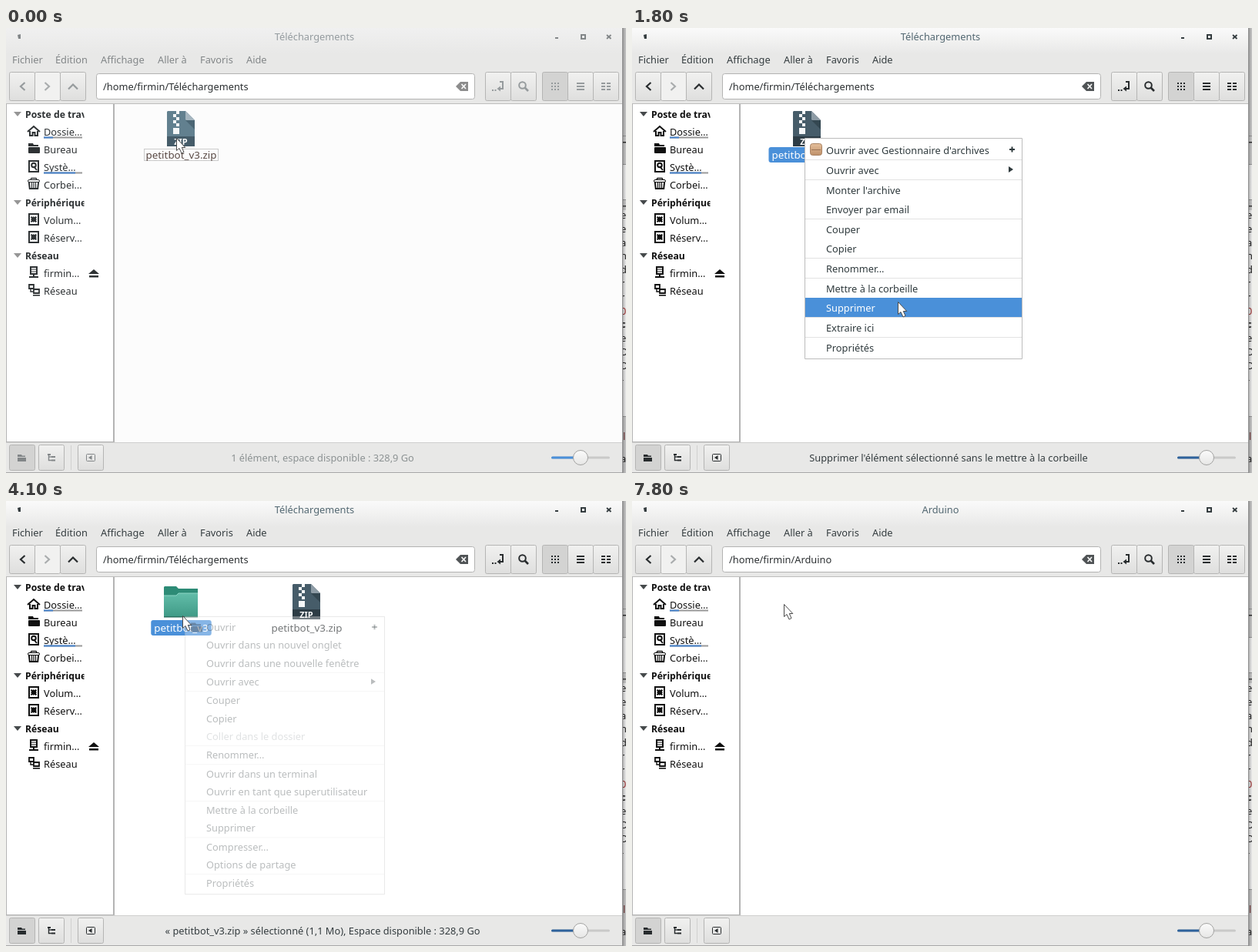
Write an HTML page with a canvas that moves like this. It is 805 px wide and 579 px high and loops after 8000 ms.

```html
<!DOCTYPE html>
<html lang="fr">
<head>
<meta charset="utf-8">
<style>
html, body { margin: 0; width: 100%; height: 100%; overflow: hidden; background: #fff; }
canvas { display: block; }
</style>
</head>
<body>
<canvas id="stage" width="805" height="579"></canvas>
<script>
const ctx = document.getElementById('stage').getContext('2d');
const FONT = '"Noto Sans", "Open Sans", sans-serif';
const BLUE = '#4a90d9', INK = '#2f3a3d', USER = 'firmin';
const LOOP = 8000, STEP = 100;

// ---------- drawing helpers ----------
function rect(x, y, w, h, c) { ctx.fillStyle = c; ctx.fillRect(x, y, w, h); }

function box(x, y, w, h, r, fill, stroke) {
  ctx.beginPath();
  ctx.roundRect(x, y, w, h, r);
  if (fill) { ctx.fillStyle = fill; ctx.fill(); }
  if (stroke) { ctx.strokeStyle = stroke; ctx.lineWidth = 1; ctx.stroke(); }
}

function trace(pts) {
  ctx.beginPath();
  for (let i = 0; i < pts.length; i += 2) ctx.lineTo(pts[i], pts[i + 1]);
}

function poly(pts, c) { trace(pts); ctx.fillStyle = c; ctx.fill(); }

function line(pts, c, w = 2) {
  trace(pts);
  ctx.strokeStyle = c;
  ctx.lineWidth = w;
  ctx.stroke();
}

function text(s, x, y, c, align = 'left', weight = 400, size = 12.8) {
  ctx.font = `${weight} ${size}px ${FONT}`;
  ctx.textAlign = align;
  ctx.fillStyle = c;
  ctx.fillText(s, x, y);
}

function grad(y0, y1, a, b) {
  const g = ctx.createLinearGradient(0, y0, 0, y1);
  g.addColorStop(0, a);
  g.addColorStop(1, b);
  return g;
}

function mix(a, b, p) {
  const v = a.map((n, i) => Math.round(n + (b[i] - n) * p));
  return `rgb(${v})`;
}

const clamp = v => Math.max(0, Math.min(1, v));

function at(x, y, draw) {
  ctx.save();
  ctx.translate(x, y);
  draw();
  ctx.restore();
}

// ---------- pointer ----------
const path = [
  [0, 221, 143], [1100, 221, 143], [1500, 323, 311], [2000, 360, 386], [2100, 364, 388],
  [3300, 364, 388], [3500, 278, 213], [3600, 278, 213], [3700, 229, 149], [4500, 229, 149],
  [4900, 295, 250], [5000, 300, 262], [5100, 300, 262], [5300, 306, 288], [6000, 306, 288],
  [6700, 76, 132], [7000, 76, 132], [7500, 212, 138], [7800, 197, 134], [8000, 197, 134]
];

function pointerAt(t) {
  const i = path.findIndex(k => k[0] > t);
  const [t0, x0, y0] = path[i - 1], [t1, x1, y1] = path[i];
  const p = (t - t0) / (t1 - t0);
  return { x: Math.round(x0 + (x1 - x0) * p), y: Math.round(y0 + (y1 - y0) * p) };
}

function drawPointer({ x, y }) {
  at(x + .5, y + .5, () => {
    const arrow = [0, 0, 0, 16, 3.5, 13, 6.5, 19.5, 9.5, 18, 6.8, 12, 11.3, 12, 0, 0];
    poly(arrow, '#fff');
    line(arrow, '#4a4a4a', 1);
  });
}

// ---------- menus: groups of [label, status] ----------
const CUT = 'Préparer les fichiers sélectionnés à être déplacés avec une commande « Coller »';
const COPY = 'Préparer les fichiers sélectionnés à être copiés avec « Coller »';
const TRASH = "Déplacer l'élément sélectionné vers la corbeille";
const DELETE = "Supprimer l'élément sélectionné sans le mettre à la corbeille";
const RENAME = "Renomme l'élément sélectionné";
const PROPS = "Afficher les propriétés de l'élément sélectionné";
const CHOOSE = "Choisir une application pour ouvrir l'élément sélectionné";

const zipMenu = {
  x: 224, y: 143, w: 283, start: 600, end: 2400, tx: 252, mark: 493, icon: 'archive',
  groups: [
    [["Ouvrir avec Gestionnaire d'archives", "Ouvrir l'élément sélectionné avec Gestionnaire d'archives"]],
    [['Ouvrir avec', CHOOSE]],
    [["Monter l'archive", "Monter l'archive sélectionnée"], ['Envoyer par email', "Envoyer l'élément sélectionné par email"]],
    [['Couper', CUT], ['Copier', COPY]],
    [['Renommer...', RENAME]],
    [['Mettre à la corbeille', TRASH], ['Supprimer', DELETE]],
    [['Extraire ici', "Extraire l'archive sélectionnée dans l'emplacement actuel"]],
    [['Propriétés', PROPS]]
  ]
};

const dirMenu = {
  x: 232, y: 150, w: 260, start: 4000, end: 5900, tx: 260, mark: 478, icon: 'folder', off: 'Coller dans le dossier',
  groups: [
    [['Ouvrir', "Ouvrir l'élément sélectionné dans cette fenêtre"],
     ['Ouvrir dans un nouvel onglet', "Ouvrir l'élément sélectionné dans un nouvel onglet"],
     ['Ouvrir dans une nouvelle fenêtre', "Ouvrir l'élément sélectionné dans une nouvelle fenêtre"]],
    [['Ouvrir avec', CHOOSE]],
    [['Couper', CUT], ['Copier', COPY], ['Coller dans le dossier', '']],
    [['Renommer...', RENAME]],
    [['Ouvrir dans un terminal', ''], ['Ouvrir en tant que superutilisateur', '']],
    [['Mettre à la corbeille', TRASH], ['Supprimer', DELETE]],
    [['Compresser...', ''], ['Options de partage', '']],
    [['Propriétés', PROPS]]
  ]
};

for (const m of [zipMenu, dirMenu]) {
  let y = m.y + 3;
  m.rows = [];
  m.rules = [];
  for (const g of m.groups) {
    for (const [label, hint] of g) {
      m.rows.push({ label, hint, y });
      y += 25;
    }
    m.rules.push(y++);
  }
  m.rules.pop();
  m.h = y - 1 + 3 - m.y;
}

function hovered(m, c) {
  if (c.x < m.x || c.x > m.x + m.w) return;
  return m.rows.find(r => c.y >= r.y && c.y < r.y + 25);
}

function smallFolder(x, y, c) {
  poly([x, y, x + 6, y, x + 7, y + 2, x + 13, y + 2, x + 13, y + 4, x, y + 4], c);
  box(x, y + 5, 15, 8, 1, c);
}

function drawMenu(m, t, c) {
  const p = clamp((t - m.start) / 300), hit = hovered(m, c);
  ctx.save();
  ctx.globalAlpha = p;
  ctx.translate(0, m.y);
  ctx.scale(1, .9 + .1 * p);
  ctx.translate(0, -m.y);
  box(m.x + .5, m.y + .5, m.w - 1, m.h - 1, 0, '#fff', '#bcbcbc');
  for (const y of m.rules) rect(m.x + 1, y, m.w - 2, 1, '#e2e2e2');
  m.rows.forEach((r, i) => {
    const on = r === hit;
    if (on) rect(m.x + 1, r.y, m.w - 2, 25, BLUE);
    const ink = on ? '#fff' : r.label === m.off ? '#a3a9aa' : INK;
    text(r.label, m.tx, r.y + 17.5, ink);
    const k = m.mark, y = r.y + 12;
    if (i === 0) {
      rect(k - 3, y - 1, 7, 2, ink);
      rect(k - .5, y - 3.5, 2, 7, ink);
    }
    if (r.label === 'Ouvrir avec') poly([k - 4, y - 4, k + 2, y, k - 4, y + 4], ink);
  });
  const first = m.rows[0].y;
  if (m.icon === 'archive') {
    box(231.5, 150.5, 15, 15, 3, grad(150, 166, '#e6c09c', '#bd8f68'), '#a98262');
    rect(233, 158, 12, 1, '#9a7355');
  } else smallFolder(240, first + 6, hit === m.rows[0] ? '#fff' : '#2e2e2e');
  ctx.restore();
}

// ---------- file icons ----------
function zipIcon(cx, lit) {
  at(cx - 18, 108, () => {
    poly([0, 1, 1, 0, 24, 0, 36, 12, 36, 46, 0, 46], lit ? '#62808f' : '#465c69');
    poly([24, 0, 36, 12, 25, 12, 24, 11], lit ? '#a5b5bf' : '#8d9ba5');
    poly([24, 12, 36, 12, 36, 24], lit ? '#4b6674' : '#344751');
    rect(0, 33, 36, 13, lit ? '#455c69' : '#2d3c45');
    for (let i = 0; i < 5; i++) rect(i % 2 ? 8 : 12, i * 4, 4, 4, '#f5f7f8');
    rect(8, 22, 8, 8, '#f5f7f8');
    text('ZIP', 18, 43.5, '#fff', 'center', 800, 11);
  });
}

function folderIcon(cx, top, lit) {
  at(cx - 22, top, () => {
    poly([0, 1, 1, 0, 16, 0, 19, 3, 44, 3, 44, 20, 0, 20], lit ? '#3da58d' : '#2d8b76');
    const front = [0, 12, 16, 12, 19, 9, 44, 9, 44, 40, 0, 40];
    poly(front, grad(9, 40, lit ? '#76d2bd' : '#62bda9', lit ? '#4fae99' : '#3f9a86'));
    line(front.slice(0, 8), '#8bd5c5', 1);
    rect(0, 39, 44, 1.5, '#28705f');
  });
}

function label(s, cx, y, state) {
  const size = 13.4;
  ctx.font = `400 ${size}px ${FONT}`;
  const w = ctx.measureText(s).width;
  if (state === 'selected') box(cx - w / 2 - 4, y - 15, w + 8, 20, 3, BLUE);
  if (state === 'focus') {
    ctx.setLineDash([1, 1]);
    box(179.5, y - 12.5, 96, 15, 0, null, '#999');
    ctx.setLineDash([]);
  }
  text(s, cx, y, state === 'selected' ? '#fff' : state === 'focus' ? '#5a4a45' : '#303436', 'center', 400, size);
}

const homeDirs = ['Arduino', 'Bureau', 'Documents', 'Images', 'Modèles', 'Musique', 'Public', 'Téléchargements', 'Vidéos'];

function drawFiles(t) {
  if (t >= 7700) return;
  if (t >= 6900) {
    homeDirs.forEach((s, i) => {
      const cx = 227 + 163 * (i % 4), y = 111 + 94 * Math.floor(i / 4);
      folderIcon(cx, y, i === 0 && t >= 7400);
      label(s, cx, y + 59, i === 0 && t >= 7600 ? 'selected' : '');
    });
    return;
  }
  const out = t >= 2900, zx = out ? 390 : 227;
  zipIcon(zx, t < 600);
  label('petitbot_v3.zip', zx + .5, 170, t < 600 ? 'focus' : t < 4000 ? 'selected' : '');
  if (out) {
    folderIcon(227, 111, t >= 3700 && t < 4000);
    label('petitbot_v3', 227.5, 170, t >= 4000 ? 'selected' : '');
  }
}

// ---------- sidebar ----------
function drive(c) {
  line([1, 1, 13, 1, 13, 15, 1, 15, 1, 0], c, 2);
}

const sideIcons = {
  home(c) {
    line([-1, 9, 7, 2, 15, 9], c, 2);
    line([2, 8, 2, 14, 5.5, 14, 5.5, 10, 8.5, 10, 8.5, 14, 12, 14, 12, 8], c, 2);
  },
  folder(c) { smallFolder(0, 1, c); },
  disk(c) {
    drive(c);
    ctx.beginPath();
    ctx.arc(7, 6.5, 2.8, 0, 7);
    ctx.strokeStyle = c;
    ctx.stroke();
    line([7, 8, 11, 13], c, 2);
  },
  trash(c) {
    box(-.5, 2.5, 15, 3, 1.5, null, c);
    line([3, 2, 4, .5, 10, .5, 11, 2], c, 1.4);
    line([.8, 5, 1.8, 14, 12.2, 14, 13.2, 5], c, 2);
    for (const x of [4.5, 7, 9.5]) line([x, 6, x, 13], c, 1.2);
  },
  chip(c) {
    drive(c);
    rect(4, 5, 6, 6, c);
    for (const x of [4, 6.5, 9]) rect(x, 4, 1, 8, c);
    for (const y of [5, 7.5, 10]) rect(3, y, 8, 1, c);
  },
  server(c) {
    line([3, 1, 11, 1, 11, 10, 3, 10, 3, 0], c, 2);
    line([4, 4, 10, 4], c, 1);
    line([4, 7, 10, 7], c, 1);
    rect(6, 10, 2, 4, c);
    rect(1, 13, 12, 2, c);
  },
  net(c) {
    line([1, 1, 7, 1, 7, 6, 1, 6, 1, 0], c, 1.8);
    line([7, 7, 14, 7, 14, 12, 7, 12, 7, 6], c, 1.8);
    line([3, 7, 3, 10, 6, 10], c, 1.4);
    rect(6, 14, 9, 1.6, c);
  }
};

const side = [
  ['Poste de travail'], ['Dossie…', 'home', 12], ['Bureau', 'folder'], ['Systè…', 'disk', 41], ['Corbei…', 'trash'],
  ['Périphériques'], ['Volum…', 'chip'], ['Réserv…', 'chip'],
  ['Réseau'], [USER + '…', 'server'], ['Réseau', 'net']
];

function drawSide(c, f) {
  const ink = mix([46, 50, 52], [16, 16, 16], f);
  rect(0, 99, 140, 440, '#fff');
  side.forEach(([s, icon, used], i) => {
    const y = 112 + 23 * i;
    if (!icon) {
      poly([10, y - 3, 20, y - 3, 15, y + 3], mix([150, 150, 150], [70, 74, 76], f));
      ctx.save();
      ctx.beginPath();
      ctx.rect(0, y - 12, 101.5, 24);
      ctx.clip();
      text(s, 25, y + 5, ink, 'left', 700, 12.2);
      ctx.restore();
      return;
    }
    const on = c.x < 139 && c.y >= y - 12 && c.y < y + 11;
    if (on) rect(0, y - 12, 139, 23, BLUE);
    const col = on ? '#fff' : ink;
    at(29, y - 9, () => sideIcons[icon](col));
    text(s, 49, y + 5, on ? '#dfeaf6' : ink);
    if (used) {
      rect(49, y + 6.5, 50, 2, '#9a9a9a');
      rect(49, y + 6.5, used, 2, '#4a86cf');
    }
    if (icon === 'server') {
      poly([107, y + 1, 114, y - 5, 121, y + 1], ink);
      rect(108, y + 3, 12, 2.5, ink);
    }
  });
  rect(0, 99, 1, 440, '#b4b4b4');
  rect(0, 538, 140, 1, '#b4b4b4');
  rect(139, 99, 2, 440, '#b4b4b4');
}

// ---------- window frame ----------
function button(x, y, w, h, state) {
  const fill = state === 'on' ? '#d3d3d2' : state === 'off' ? '#f1f1f0' : grad(y, y + h, '#f1f1f0', '#dededd');
  box(x + .5, y + .5, w - 1, h - 1, 2, fill, '#b5b5b4');
}

function drawBar(f) {
  const g = mix([150, 155, 157], [40, 44, 46], f);
  const dim = '#a9acad';
  button(4, 57, 34, 38);
  button(37, 57, 34, 38, 'off');
  button(70, 57, 34, 38);
  line([24.5, 71, 19, 76, 24.5, 81], g, 2.2);
  line([50.5, 71, 56, 76, 50.5, 81], dim, 2.2);
  line([81, 79.5, 87, 73.5, 93, 79.5], g, 2.2);

  box(117.5, 59.5, 491, 33, 3, '#fff', '#b3b3b2');
  poly([584, 76, 590, 70, 600, 70, 600, 82, 590, 82], mix([140, 140, 140], [80, 84, 86], f));
  line([591.5, 73, 597, 79], '#fff', 1.6);
  line([597, 73, 591.5, 79], '#fff', 1.6);

  button(622, 57, 34, 38);
  button(655, 57, 34, 38);
  rect(631, 80, 2, 2, g);
  rect(634.5, 80, 2, 2, g);
  line([641, 70, 645, 70, 645, 79, 641, 79], g, 2);
  poly([637.5, 79, 642, 75.5, 642, 82.5], g);
  ctx.beginPath();
  ctx.arc(670.5, 74.5, 4.3, 0, 7);
  ctx.strokeStyle = g;
  ctx.lineWidth = 2;
  ctx.stroke();
  line([673.5, 77.5, 678, 82], g, 2.6);

  button(696, 57, 34, 38, 'on');
  button(729, 57, 34, 38);
  button(762, 57, 34, 38);
  for (const y of [71, 75, 79]) {
    for (const x of [708, 712, 716]) rect(x, y, 2, 2, g);
    rect(741, y, 10, 2, g);
    rect(773, y, 5, 2, g);
    rect(780, y, 5, 2, g);
  }
}

function drawFoot(f, status) {
  const g = mix([130, 134, 136], [40, 44, 46], f);
  rect(0, 539, 800, 40, '#e8e8e7');
  rect(0, 539, 800, 1, '#cfcfce');
  button(4, 542, 34, 34, 'on');
  button(42, 542, 34, 34);
  rect(84, 543, 1, 32, '#d0d0cf');
  button(93, 542, 34, 34);
  poly([15, 555, 20, 555, 21, 556.5, 25, 556.5, 25, 558, 15, 558], g);
  rect(15, 559, 11, 5, g);
  line([55.5, 554, 55.5, 562.5, 59, 562.5], g, 1.4);
  line([55, 558, 59, 558], g, 1.4);
  rect(54, 554, 4, 2, g);
  rect(59, 557, 5, 2, g);
  rect(59, 561.5, 5, 2, g);
  box(104.5, 554.5, 11, 9, 1, null, g);
  poly([107, 559, 111.5, 556, 111.5, 562], g);
  text(status, 411, 564, mix([140, 146, 147], [52, 60, 63], f), 'center');
  box(708, 557.5, 76, 3, 1.5, '#c9c9c8');
  box(708, 557.5, 36, 3, 1.5, mix([74, 144, 217], [46, 98, 156], f));
  ctx.beginPath();
  ctx.arc(746, 559, 9.5, 0, 7);
  ctx.fillStyle = grad(549, 569, '#fbfbfb', '#e6e6e5');
  ctx.fill();
  ctx.strokeStyle = '#a2a2a1';
  ctx.lineWidth = 1;
  ctx.stroke();
}

// Sliver of the window lying behind
function drawEdge() {
  rect(800, 0, 5, 579, '#d9d9d9');
  rect(800, 178, 5, 45, '#fff');
  rect(800, 237, 5, 268, '#fff');
  for (const y of [140, 177, 223, 505]) rect(800, y, 5, 1, '#a4a4a4');
  rect(800, 148, 5, 1.5, '#333');
  rect(800, 231, 5, 1.5, '#444');
  ctx.save();
  ctx.beginPath();
  ctx.rect(800, 0, 5, 579);
  ctx.clip();
  [...'eeandrr0ceDD-'].forEach((s, i) => {
    text(s, 798, 248 + 17.8 * i, i === 7 ? '#a33' : '#222', 'left', i === 8 ? 700 : 400);
  });
  text('l', 801, 536, '#733');
  text('a', 798, 565, '#222');
  ctx.restore();
  const g = ctx.createLinearGradient(800, 0, 805, 0);
  g.addColorStop(0, 'rgba(0,0,0,.35)');
  g.addColorStop(1, 'rgba(0,0,0,.08)');
  rect(800, 0, 5, 579, g);
  rect(800, 0, 1, 579, '#8e8e8e');
}

const bar = [['Fichier', 8], ['Édition', 64], ['Affichage', 123], ['Aller à', 197], ['Favoris', 252], ['Aide', 312]];

function statusAt(t, menu, c) {
  const hit = menu && hovered(menu, c), free = 'space disponible : 328,9 Go';
  if (hit && hit.hint) return hit.hint;
  if (t < 600) return '1 élément, e' + free;
  if (t < 4200) return '« petitbot_v3.zip » sélectionné (1,1 Mo), E' + free;
  if (t < 5900) return '« petitbot_v3 » sélectionné (contenant 3 éléments), E' + free;
  if (t < 6400) return '« petitbot_v3 » sera copié si vous sélectionnez la commande Coller';
  if (t >= 6900 && t < 7700) return homeDirs.length + ' éléments, e' + free;
  return '';
}

function draw(t) {
  const f = clamp((t - 550) / 300), c = pointerAt(t);
  const menu = [zipMenu, dirMenu].find(m => t >= m.start && t < m.end);
  const place = t < 6900 ? 'Téléchargements' : t < 7700 ? '' : 'Arduino';
  const v = Math.round(240 + 10 * f);

  rect(0, 0, 805, 579, '#e8e8e7');
  rect(0, 0, 800, 34, grad(0, 34, `rgb(${v},${v},${v})`, '#e8e8e7'));
  const chrome = mix([130, 134, 136], [52, 60, 63], f);
  text(place || 'Dossier personnel', 400.5, 16, mix([148, 155, 159], [82, 103, 113], f), 'center');
  poly([15, 9, 19, 8, 19, 14, 16, 14], chrome);
  rect(713, 12, 4, 2, chrome);
  line([747, 9, 752, 9, 752, 14, 747, 14, 747, 8], chrome, 2);
  line([780, 9, 785.5, 14], chrome, 1.8);
  line([785.5, 9, 780, 14], chrome, 1.8);
  for (const [s, x] of bar) text(s, x, 46, chrome);
  drawBar(f);
  text('/home/' + USER + (place && '/' + place), 126, 81, '#2b2f31');

  rect(0, 98, 800, 1, '#bdbdbc');
  rect(141, 99, 659, 440, mix([252, 252, 252], [255, 255, 255], f));
  drawSide(c, f);
  drawFiles(t);
  drawFoot(f, statusAt(t, menu, c));
  rect(0, 578, 800, 1, '#a8a8a8');
  drawEdge();
  if (menu) drawMenu(menu, t, c);
  drawPointer(c);
}

const origin = performance.now();
function tick() {
  const t = (performance.now() - origin) % LOOP;
  draw(Math.floor(t / STEP) * STEP);
  requestAnimationFrame(tick);
}
tick();
</script>
</body>
</html>
```
